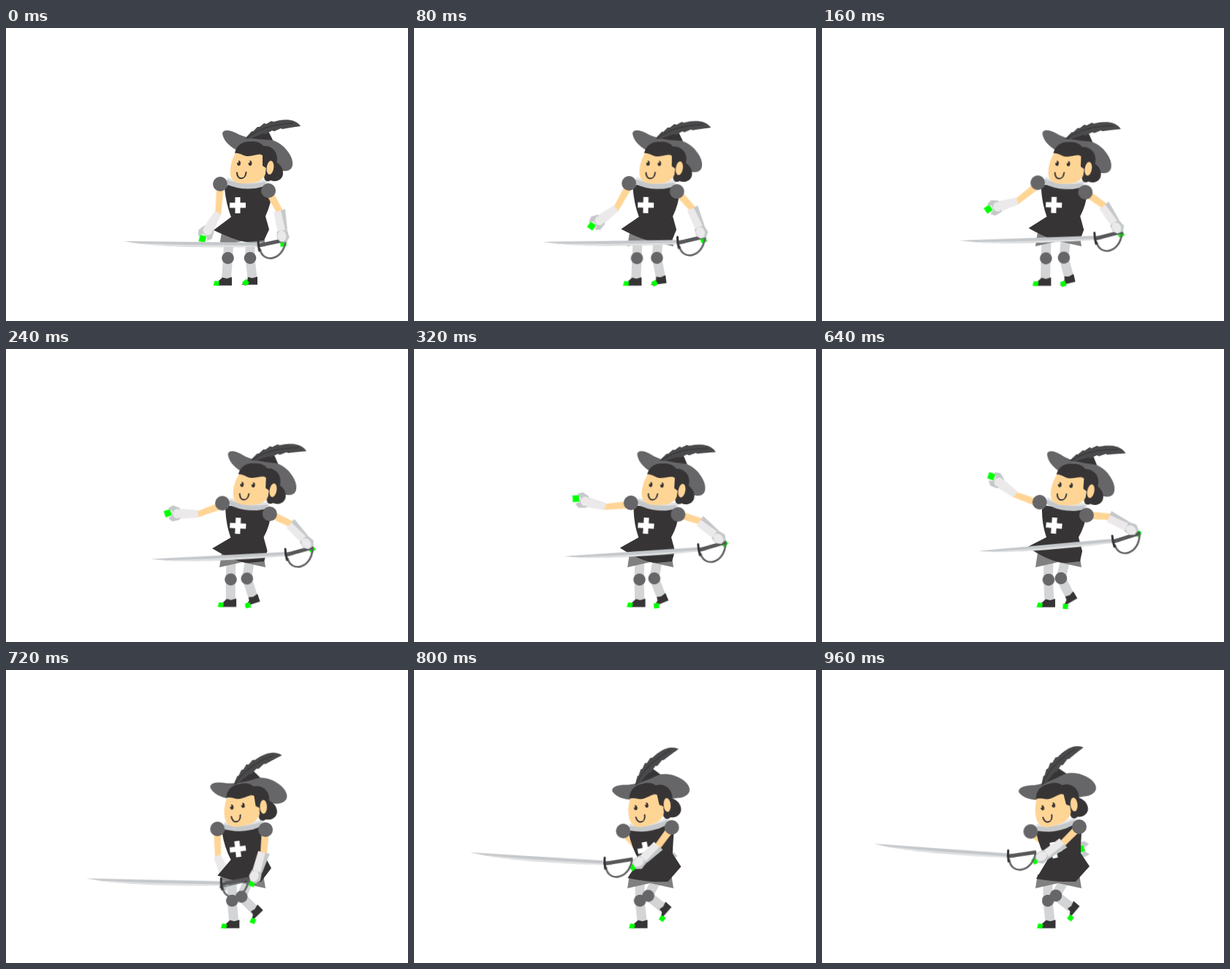
Recreate the animation shown at these times as an HTML page without scripts. Size 550 px wide and 400 px high, loop 1000 ms.

```html
<!DOCTYPE html>
<html lang="en">
<head>
<meta charset="utf-8">
<title>Fencer</title>
<style>
  html, body { margin: 0; width: 100%; height: 100%; overflow: hidden; background: #fff; }
  svg { display: block; width: 100vw; height: 100vh; }

  /* Each part has three poses: --a rest, --b wind-up, --c thrust */
  @keyframes move {
    0% { transform: var(--a); animation-timing-function: cubic-bezier(.333, .667, .667, 1); }
    64% { transform: var(--b); animation-timing-function: cubic-bezier(.25, 1, .5, 1); }
    96%, 100% { transform: var(--c); }
  }
  @keyframes morph {
    0% { d: var(--a); animation-timing-function: cubic-bezier(.333, .667, .667, 1); }
    64% { d: var(--b); animation-timing-function: cubic-bezier(.25, 1, .5, 1); }
    96%, 100% { d: var(--c); }
  }
  .move { --a: translate(0px, 0px) rotate(0deg); animation: move 1s infinite; }
  .morph { animation: morph 1s infinite; }

  .dark { fill: #373435; }
  .mid { fill: #666568; }
  .skin { fill: #ffd596; }
  .pale { fill: #ebe9ea; }
  .steel { fill: #c5c8cb; }
  .mark { fill: #0f0; }
  .leg { fill: none; stroke: #d3d4d6; stroke-width: 13; stroke-linejoin: round; }
  .line { fill: none; stroke: #373435; stroke-width: 2; stroke-linecap: round; }

  .hat {
    transform-origin: 350px 137px;
    --b: translate(13px, 4px) rotate(5.4deg);
    --c: translate(-37px, -2.5px) rotate(-29.5deg);
  }
  .head {
    transform-origin: 324px 193px;
    --b: translate(6.5px, 1px) rotate(4deg);
    --c: translate(-15px, 2px) rotate(-14deg);
  }
  .collar {
    transform-origin: 329px 212px;
    --b: translate(5px, 1px) rotate(6deg);
    --c: translate(-8px, 0px) rotate(-13deg);
  }
  .torso {
    --a: path("M304 214 L299 219 Q301 240 308 258 L284 276 Q318 292 330 292 L353 290 L360 275 L355 257 Q363 240 364 222 L355 216 Z");
    --b: path("M306 214 L301 219 Q301 240 307 257 L281 270 Q311 291 333 292 L353 290 L356 276 L351 257 Q360 242 362 224 L357 218 Z");
    --c: path("M300 216 L293 222 Q298 244 308 260 L293 285 Q318 289 330 289 L347 289 L366 268 L354 250 Q354 236 355 222 L344 212 Z");
  }
  .cross {
    transform-origin: 317px 242px;
    --b: translate(.5px, -1px) rotate(5deg);
    --c: translate(0px, 4px) rotate(-12deg);
  }

  .leg-l {
    --a: path("M305 288 L303.5 314 L301.5 342");
    --b: path("M310 288 L309.5 315 L311 343");
    --c: path("M309 288 L309 315 L312 343");
  }
  .leg-r {
    --a: path("M334 288 L334 314 L337 342");
    --b: path("M333 288 L327 313 L339 337");
    --c: path("M331 288 L320 308 L341 324");
  }
  .knee-l { --b: translate(6.5px, 1px) rotate(0deg); --c: translate(5.5px, 1px) rotate(0deg); }
  .knee-r { --b: translate(-7px, -1px) rotate(0deg); --c: translate(-14px, -6px) rotate(0deg); }
  .shoe-l { --b: translate(10px, 1px) rotate(0deg); --c: translate(10.5px, 1px) rotate(0deg); }
  .shoe-r {
    transform-origin: 337px 340px;
    --b: translate(1px, -5px) rotate(-30deg);
    --c: translate(3px, -19px) rotate(-50deg);
  }
  .toe-r {
    transform-origin: 328px 347.5px;
    --a: translate(0px, 0px) rotate(-40deg);
    --b: translate(5px, 4px) rotate(5deg);
    --c: translate(12px, -9px) rotate(35deg);
  }

  .pad-l { --a: translate(293px, 213px); --b: translate(298px, 209px); --c: translate(285.5px, 220.5px); }
  .joint-l { --a: translate(293px, 217px); --b: translate(298px, 211px); --c: translate(285px, 221px); }
  .upper-l { --a: rotate(94deg); --b: rotate(202deg); --c: rotate(38deg); }
  .fore-l {
    --a: translate(37px, 0px) rotate(28deg);
    --b: translate(37px, 0px) rotate(19deg);
    --c: translate(37px, 0px) rotate(-37deg);
  }
  .hand-l { --b: translate(0px, 0px) rotate(0deg); --c: translate(12px, 0px) rotate(0deg); }
  .joint-r { --a: translate(359px, 222px); --b: translate(362px, 227px); --c: translate(352px, 214px); }
  .upper-r { --a: rotate(61.8deg); --b: rotate(2.5deg); --c: rotate(135deg); }
  .fore-r {
    --a: translate(32px, 0px) rotate(21.2deg);
    --b: translate(32px, 0px) rotate(26deg);
    --c: translate(32px, 0px) rotate(12deg);
  }
  .sword {
    --a: translate(40.6px, -4.4px) rotate(-83deg);
    --b: translate(47.8px, -1px) rotate(-34.4deg);
    --c: translate(37.5px, 8.8px) rotate(-143.5deg);
  }
</style>
</head>
<body>
<svg viewBox="0 0 550 400">
  <!-- back arm -->
  <g class="move joint-l"><g class="move upper-l">
    <path class="skin" d="M0 -5 L39 -4 V4 L0 5 Z"/>
    <g class="move fore-l">
      <path class="pale" d="M-2 -4 L24 -7 L27 7 L-1 6 Z"/>
      <g class="move hand-l">
        <path class="steel" d="M23 -8 L33 -11 L39 -7 L34 -3 V3 L40 7 L33 11 L24 8 Z"/>
        <ellipse class="pale" cx="27" rx="6" ry="6.5"/>
      </g>
      <rect class="mark" x="35.5" y="-4.5" width="9" height="9" transform="rotate(-20 40 0)"/>
    </g>
  </g></g>

  <!-- legs -->
  <path class="morph leg leg-l" d="M305 288 L303.5 314 L301.5 342"/>
  <circle class="move mid knee-l" cx="303.5" cy="314" r="8.3"/>
  <g class="move shoe-l">
    <path class="dark" d="M290 351.5 V346 L296 340.5 L302 342 L309 340 V351.5 Z"/>
    <path class="mark" d="M285.5 345 L292 346 L291 352 L283.5 351.5 Z"/>
  </g>
  <path class="morph leg leg-r" d="M334 288 L334 314 L337 342"/>
  <circle class="move mid knee-r" cx="334" cy="314" r="8.3"/>
  <path class="move dark shoe-r" d="M322 350.5 L330 345 L331 340 L337 341.5 L344 339.5 V350.5 Z"/>
  <rect class="move mark toe-r" x="324.5" y="344" width="7" height="7"/>

  <!-- body -->
  <path fill="#808081" d="M295 279 H352 L355 298 L323 291 L292 298 Z"/>
  <path class="morph dark torso" d="M304 214 L299 219 L308 258 L284 276 L330 292 L353 290 L360 275 L355 257 L364 222 Z"/>
  <path class="move cross" fill="#fff" d="M313.5 231 h7 v7.5 h7.5 v7 h-7.5 v7.5 h-7 v-7.5 h-7.5 v-7 h7.5 Z"/>
  <g class="move collar">
    <path fill="#e3e4e6" d="M303 204 Q330 214 357 206 L358 214 Q330 222 302 211 Z"/>
    <path class="steel" d="M302 207 Q328 216 355 210 L354 216 Q328 224 303 214 Z"/>
  </g>
  <circle class="move mid pad-l" r="10"/>

  <!-- hat -->
  <g class="move hat">
    <path class="dark" d="M327 152 L347 143 C352 141 357 139 360 143 L366 155 Z"/>
    <path class="mid" d="M296 144 C297 138 306 139 314 143 C328 151 345 152 364 153 C380 157 394 176 392 187 C391 196 380 197 372 193 C350 186 330 172 316 167 C305 161 297 153 296 144 Z"/>
    <path fill="#4a494b" d="M327 151 L336 141 L338 141 L344 135 L347 135 L353 130 L356 131 L363 127 L366 128 C378 124 396 123 403 134 C393 135 385 137 378 138 L376 137 L367 141 L364 140 L355 145 L352 144 L334 151 Z"/>
    <path class="line" d="M330 150 Q352 132 392 130" style="stroke-width:1.2"/>
  </g>

  <!-- head -->
  <g class="move head">
    <path class="dark" d="M355 196 C350 206 356 212 362 208 C368 211 379 208 379 198 C379 190 374 186 370 183 L356 183 Z"/>
    <path class="skin" d="M316 167 C309 178 306 190 307 200 C309 211 318 213 330 212 C343 212 352 208 355 199 L357 168 Z"/>
    <path class="dark" d="M313 171 C315 159 325 154 335 155 C343 154 350 158 352 161 C363 160 371 168 371 178 L370 188 L357 192 L351 188 L351 174 C345 170 338 176 330 175 C324 175 320 170 313 171 Z"/>
    <ellipse class="skin" cx="361.5" cy="190.5" rx="4.8" ry="9.5" transform="rotate(8 361 190)"/>
    <g class="dark">
      <ellipse cx="318.5" cy="184.5" rx="2.4" ry="3.6"/>
      <ellipse cx="334" cy="184.5" rx="2.4" ry="3.6"/>
    </g>
    <g class="skin">
      <circle cx="316.8" cy="182.5" r="1.5"/>
      <circle cx="332.3" cy="182.5" r="1.5"/>
    </g>
    <path class="line" d="M316 197.5 C316 208 327.500 208 328.5 197"/>
  </g>

  <!-- sword arm -->
  <g class="move joint-r">
    <g class="move upper-r">
      <path class="skin" d="M0 -5 L34 -4.5 V4.5 L0 5 Z"/>
      <g class="move fore-r">
        <rect class="mark" x="40.5" y="-3.5" width="8" height="8"/>
        <g class="move sword"><g transform="translate(-383 -289)">
          <path class="steel" d="M160 290 Q250 291 350 292 L355 297.5 Q220 301 160 290 Z"/>
          <path fill="#e0e1e2" d="M172 292.5 Q250 296 354 296 L355 297.5 Q230 300 172 292.5 Z"/>
          <path class="line" d="M347 301 C350 320 378 318 382 290" style="stroke:#666568;stroke-width:2.6"/>
          <path d="M345 296 L383 288" stroke="#58575a" stroke-width="5"/>
          <path class="line" d="M344.5 288 Q344 296 346 303" style="stroke-width:3"/>
        </g></g>
        <path class="pale" d="M0 8 L-1 -6 L28 -6 L29 6 Z"/>
        <path class="steel" d="M-2 -8 L26 -7.5 L28 -5 L-1 -2 Z"/>
        <path class="steel" d="M26 -7 L37 -9 L43 -4 L42 4 L36 8 L27 7 Z"/>
        <ellipse class="pale" cx="34" cy="1" rx="7.5" ry="6"/>
      </g>
    </g>
    <circle class="mid" r="10"/>
  </g>
</svg>
</body>
</html>
```
